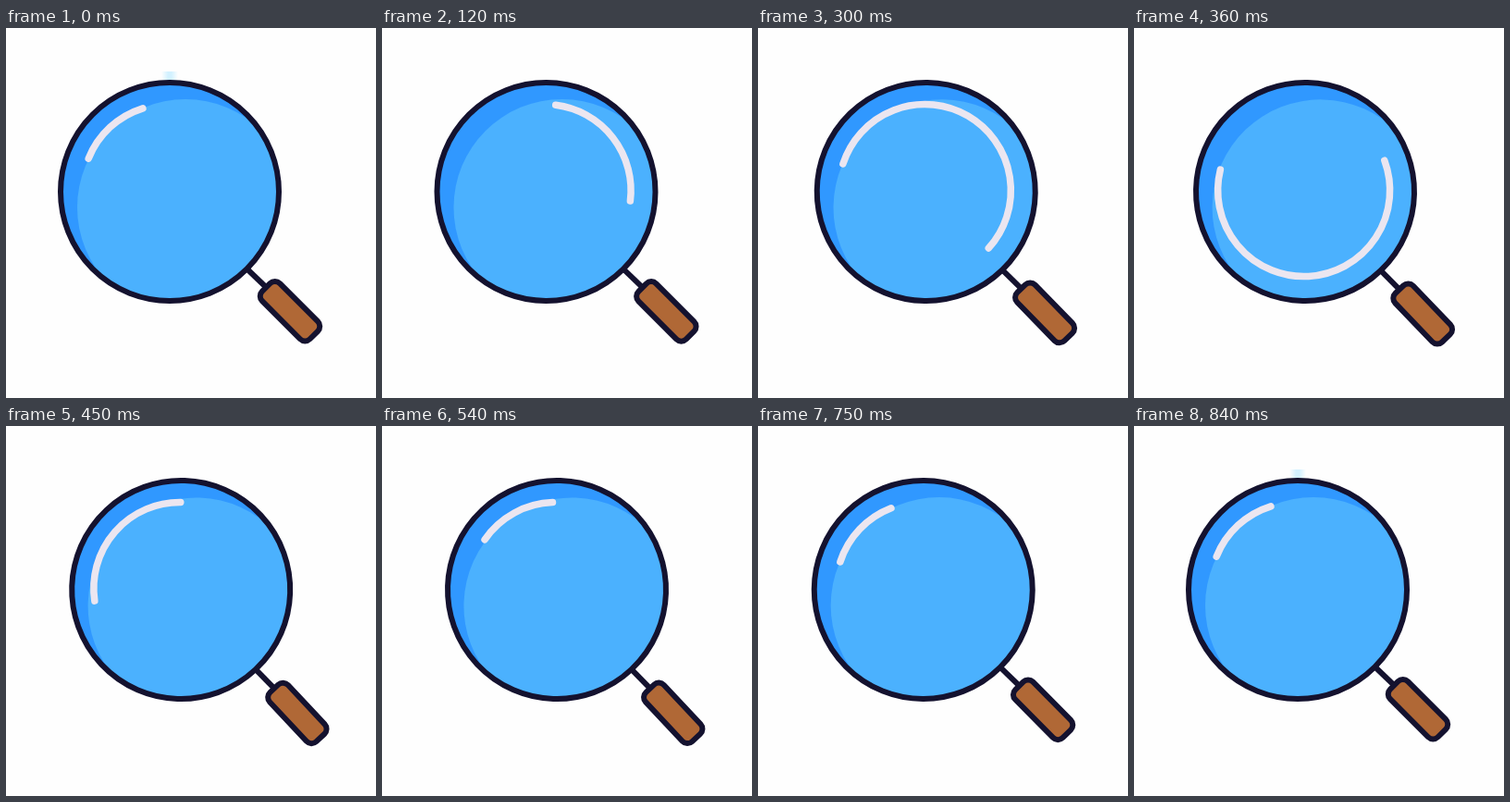
Recreate the animation shown at these times as an HTML page. Size 400 by 400 pixels, loop 2.87 s.

```html
<!DOCTYPE html>
<html lang="en">
<head>
<meta charset="utf-8">
<title>Magnifying glass</title>
<style>
  html, body { margin: 0; width: 100%; height: 100%; overflow: hidden; background: #fefefe; }
  svg { display: block; width: 100%; height: 100%; }
  .ink { stroke: #14122f; stroke-width: 6; }
</style>
</head>
<body>
<svg viewBox="0 0 400 400">
  <defs>
    <clipPath id="lens"><circle cx="177" cy="177" r="118"/></clipPath>
    <linearGradient id="glow">
      <stop offset="0" stop-color="#d2f1ff" stop-opacity="0"/>
      <stop offset=".4" stop-color="#d2f1ff"/>
      <stop offset=".6" stop-color="#d2f1ff"/>
      <stop offset="1" stop-color="#d2f1ff" stop-opacity="0"/>
    </linearGradient>
  </defs>
  <rect id="spark" x="168" y="47" width="18" height="12" fill="url(#glow)"/>
  <g id="glass">
    <path class="ink" d="M258 258L283 282"/>
    <rect class="ink" x="-36.5" y="-13.5" width="73" height="27" rx="7.5" fill="#b06836"
      transform="translate(307 306.2) rotate(45)"/>
    <g clip-path="url(#lens)">
      <circle cx="177" cy="177" r="118" fill="#3098ff"/>
      <circle cx="194" cy="194" r="117" fill="#4bb1fe"/>
    </g>
    <circle class="ink" cx="177" cy="177" r="118" fill="none"/>
    <path id="shine" fill="none" stroke="#ebe6f0" stroke-width="7.5" stroke-linecap="round"/>
  </g>
</svg>
<script>
const LOOP = 2870, STEP = 30, REST = 840;
const times = [0, 120, 240, 360, 450, 540, 660, 840];
const sway = [0, .5, 2, 8, 12.2, 12, 5.3, 0];               // px to the right
const tail = [0, 75.4, 227.5, 496.7, 688, 731, 713.5, 720];  // degrees turned
const head = [0, 114.3, 345.1, 660, 736, 733.5, 714, 720];
const [spark, glass, shine] = ['spark', 'glass', 'shine'].map(id => document.getElementById(id));

const slope = (v, i) => i === 0 || i === v.length - 1 ? 0
  : (v[i + 1] - v[i - 1]) / (times[i + 1] - times[i - 1]);

// Smooth curve through the key values
function curve(v, t) {
  if (t >= REST) return v[v.length - 1];
  const i = times.findIndex(k => k > t) - 1;
  const span = times[i + 1] - times[i], u = (t - times[i]) / span, w = 1 - u;
  return w * w * ((1 + 2 * u) * v[i] + u * span * slope(v, i))
    + u * u * ((1 + 2 * w) * v[i + 1] - w * span * slope(v, i + 1));
}

function rim(deg) {
  const a = deg * Math.PI / 180;
  return `${175.6 + 93 * Math.cos(a)} ${175.6 + 93 * Math.sin(a)}`;
}

function draw(now) {
  const t = Math.floor(now % LOOP / STEP) * STEP;
  const x = curve(sway, t);
  const from = 201.7 + curve(tail, t), to = 252.7 + curve(head, t);
  glass.setAttribute('transform', `translate(${x}) rotate(${x * .155} 177 177)`);
  shine.setAttribute('d', `M${rim(from)}A93 93 0 ${to - from > 180 ? 1 : 0} 1 ${rim(to)}`);
  spark.style.display = t === 0 || t >= REST ? '' : 'none';
}

const start = performance.now();
function tick() {
  draw(performance.now() - start);
  requestAnimationFrame(tick);
}
tick();
</script>
</body>
</html>
```
